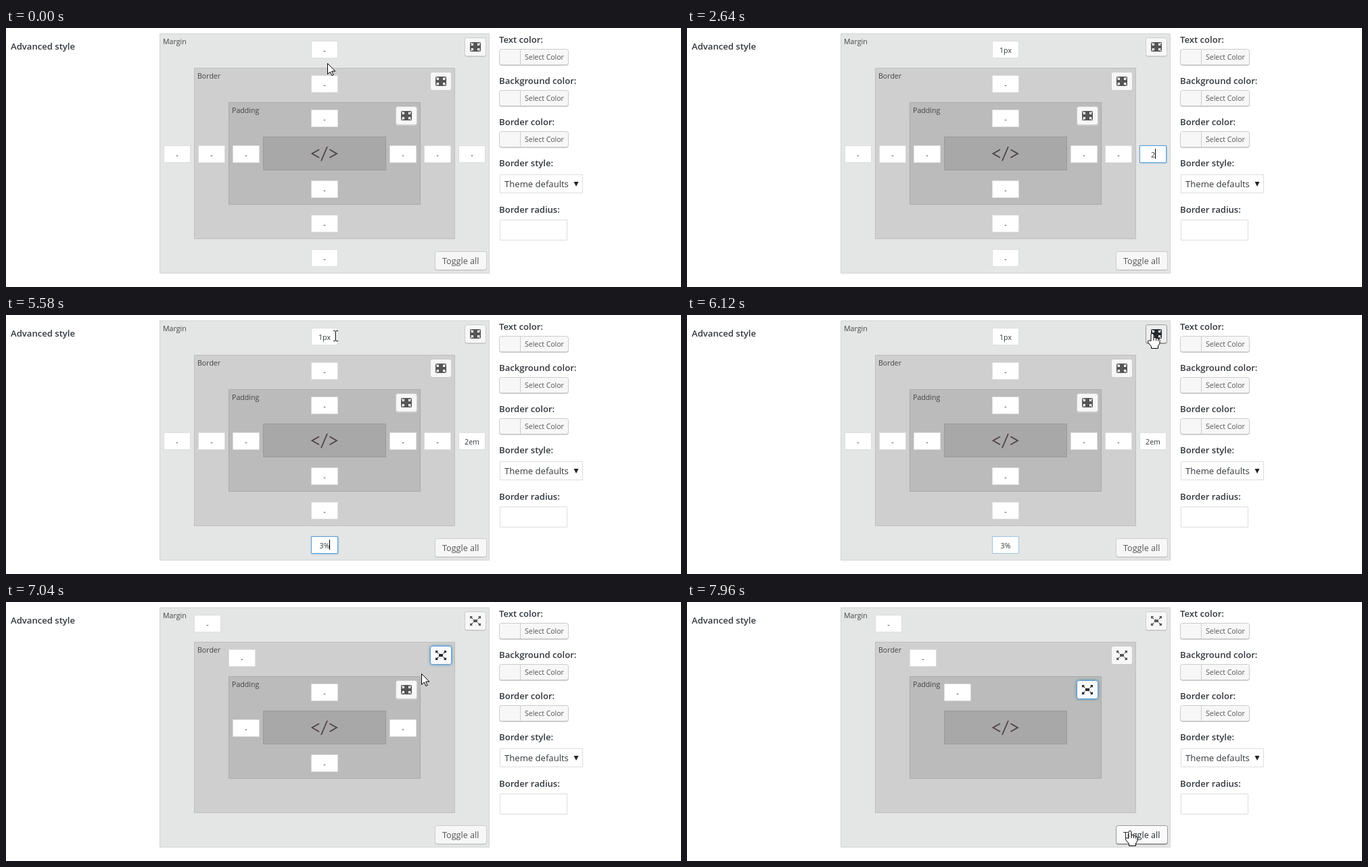
An HTML page with a canvas for the animation above (8 s loop, 998x384 px).

```html
<!DOCTYPE html>
<html lang="en">
<head>
<meta charset="utf-8">
<title>Advanced style</title>
<style>
  html, body { margin: 0; width: 100%; height: 100%; overflow: hidden; background: #fff; }
  canvas { display: block; }
</style>
</head>
<body>
<canvas id="stage" width="998" height="384"></canvas>
<script>
const ctx = document.getElementById('stage').getContext('2d');
const LOOP = 8000, STEP = 76.5;
const SANS = '"Open Sans", "Noto Sans", sans-serif';
const BLUE = '#5b9dd9';

const contractIcon = new Path2D('M15.75 6.75L18 3v14l-2.25-3.75L17 12h-4v4l1.25-1.25L18 17H2l3.75-2.25L7 16v-4H3l1.25 1.25L2 17V3l2.25 3.75L3 8h4V4L5.75 5.25 2 3h16l-3.75 2.25L13 4v4h4z');
const expandIcon = new Path2D('M7 8h6v4H7zM2 13v4h4l-1.2-1.2L7 12l-3.8 2.2zM14 17h4v-4l-1.2 1.2L13 12l2.2 3.8zM14 3l1.3 1.3L13 8l3.8-2.2L18 7V3zM6 3H2v4l1.2-1.2L7 8 4.7 4.3z');
const arrow = new Path2D('M.5 .5V16.5L4.2 13L6.9 18.6L9.2 17.5L6.6 12.1H11.8Z');
const hand = new Path2D('M-2 11.5V1.5Q0-1.5 2 1.5V6.5Q4 5.5 5.5 7.5Q7.5 6.5 8.5 8.5Q11 8 11 10.5V15L8.5 19V22.5H-1.5V19.5L-6.5 13.5Q-7 10.5-4.5 10.7Z');
const beam = new Path2D('M-3 -7.5H0M1 -7.5H4M.5 -7V7M-3 7.5H0M1 7.5H4');
const code = new Path2D('M463 180.2L452.5 186.2L463 192.2M466 197L475 176M478.5 180.2L489 186.2L478.5 192.2');

// Each layer is inset by 51 px from the one around it.
const layers = [
  { name: 'Margin', fill: '#e4e6e5', edge: '#d2d4d3', press: 6120, fold: 6200 },
  { name: 'Border', fill: '#cfcfcf', edge: '#bfbfbf', press: 6740, fold: 6815 },
  { name: 'Padding', fill: '#babbba', edge: '#a9aaa9', press: 7275, fold: 7350 },
];

// Margin sides: when each has focus, and what it reads over time.
const typing = [
  { from: 453, to: 2180, keys: [[930, '1'], [1630, '1p'], [1800, '1px']] },
  { from: 2180, to: 3330, keys: [[2640, '2'], [3020, '2e'], [3100, '2em']] },
  { from: 3330, to: 6120, keys: [[3790, '3'], [4650, '3%']] },
  { from: 0, to: 0, keys: [] },
];

// Pointer stops: time, x, y
const route = [
  [0, 475, 52], [70, 478, 51], [225, 504, 38], [400, 475, 31], [5500, 475, 31],
  [6040, 688, 27], [6270, 688, 27], [6660, 645, 75], [6815, 645, 75],
  [7200, 593, 127], [7350, 593, 127], [7940, 655, 339], [8000, 655, 339],
];

function pointerAt(t) {
  const i = Math.max(1, route.findIndex(stop => stop[0] > t));
  const [t0, x0, y0] = route[i - 1], [t1, x1, y1] = route[i];
  const p = (t - t0) / (t1 - t0), e = p * p * (3 - 2 * p);
  return { x: Math.round(x0 + (x1 - x0) * e), y: Math.round(y0 + (y1 - y0) * e) };
}

const inside = (p, x, y, w, h) => p.x >= x && p.x < x + w && p.y >= y && p.y < y + h;

function text(str, x, y, size, color = '#444', weight = 400, align = 'left') {
  ctx.font = `${weight} ${size}px ${SANS}`;
  ctx.textAlign = align;
  ctx.fillStyle = color;
  ctx.fillText(str, x, y);
}

function box(x, y, w, h, fill, edge, radius = 0, glow = 0) {
  ctx.beginPath();
  ctx.roundRect(x + .5, y + .5, w - 1, h - 1, radius);
  ctx.save();
  ctx.shadowColor = 'rgba(0,115,170,.8)';
  ctx.shadowBlur = glow;
  ctx.fillStyle = fill;
  ctx.fill();
  ctx.restore();
  ctx.strokeStyle = edge;
  ctx.stroke();
}

function button(x, y, w, h, { hover, focus, pressed } = {}) {
  const edge = pressed || (hover && !focus) ? '#999' : focus ? BLUE : '#ccc';
  if (!focus) box(x, y + 1, w, h, edge, edge, 3);
  box(x, y, w, h, pressed ? '#eee' : hover || focus ? '#fafafa' : '#f7f7f7', edge, 3, focus ? 4 : 0);
}

function input(x, y, value, focus, fading) {
  box(x, y, 40, 26, '#fff', focus ? BLUE : fading ? '#9cc3e8' : '#ddd', 0, focus ? 3 : 0);
  text(value || '-', x + 20, y + 18, 10.6, '#32373c', 400, 'center');
  if (focus) {
    const half = value ? ctx.measureText(value).width / 2 : 0;
    ctx.fillStyle = '#000';
    ctx.fillRect(Math.round(x + 20 + half), y + 5, 1, 15);
  }
}

function drawLayer(layer, i, t, pointer) {
  const d = i * 51, folded = t >= layer.fold;
  box(227 + d, 8 + d, 488 - 2 * d, 356 - 2 * d, layer.fill, layer.edge);
  text(layer.name, 232 + d, 24 + d, 10.6);

  const bx = 678 - d, by = 14 + d;
  const hover = inside(pointer, bx, by, 32, 28);
  const nextPress = i < 2 ? layers[i + 1].press : LOOP;
  const focus = folded && t < nextPress;
  button(bx, by, 32, 28, { hover, focus, pressed: t >= layer.press && !folded });
  ctx.save();
  ctx.translate(bx + 6, by + 4);
  ctx.fillStyle = hover || focus ? '#23282d' : '#555';
  ctx.fill(folded ? expandIcon : contractIcon);
  ctx.restore();
}

function drawInputs(layer, i, t) {
  const d = i * 51;
  if (t >= layer.fold) return input(278 + d, 19 + d);
  const sides = [[451, 19 + d], [669 - d, 174], [451, 328 - d], [233 + d, 174]];
  sides.forEach(([x, y], side) => {
    const { from, to, keys } = i ? typing[3] : typing[side];
    const key = keys.filter(k => k[0] <= t).pop();
    input(x, y, key && key[1], t >= from && t < to, side === 2 && to && t >= to);
  });
}

function drawSidebar() {
  const label = (str, y) => text(str, 729, y, 13.1, '#32373c', 600);
  ['Text color:', 'Background color:', 'Border color:'].forEach((name, i) => {
    const y = 31 + i * 61;
    label(name, y - 9);
    button(729, y, 103, 24);
    ctx.fillStyle = '#ccc';
    ctx.fillRect(760, y, 1, 24);
    text('Select Color', 767, y + 16, 10.5, '#555');
  });
  label('Border style:', 205);
  box(730, 217, 123, 28, '#fff', '#ddd');
  text('Theme defaults', 737, 236, 13.1, '#32373c');
  ctx.fillStyle = '#222';
  ctx.fill(new Path2D('M839.5 228H846.5L843 235Z'));
  label('Border radius:', 274);
  box(730, 284, 100, 31, '#fff', '#ddd');
}

function drawPointer(p, t) {
  if (t >= 2180 && t < 5570) return;
  const overButton = inside(p, 634, 331, 77, 28) ||
    layers.some((_, i) => inside(p, 678 - i * 51, 14 + i * 51, 32, 28));
  ctx.save();
  ctx.translate(p.x, p.y);
  ctx.strokeStyle = '#000';
  if (t < layers[0].fold && inside(p, 451, 19, 40, 26)) {
    ctx.stroke(beam);
  } else {
    const shape = overButton ? hand : arrow;
    ctx.fillStyle = '#fff';
    ctx.fill(shape);
    ctx.stroke(shape);
    if (overButton) ctx.stroke(new Path2D('M2 6.5V11M5.5 7.5V11M8.5 8.5V11.5'));
  }
  ctx.restore();
}

function draw(now) {
  const t = now % LOOP;
  const stepped = Math.max(0, 70 + Math.floor((t - 70) / STEP) * STEP);
  const pointer = pointerAt(stepped);
  ctx.fillStyle = '#fff';
  ctx.fillRect(0, 0, 998, 384);
  text('Advanced style', 7, 32, 13.1, '#32373c', 600);
  layers.forEach((layer, i) => drawLayer(layer, i, t, pointer));
  box(380, 161, 182, 50, '#a8a8a8', '#999');
  ctx.lineWidth = 1.8;
  ctx.strokeStyle = '#4c4247';
  ctx.stroke(code);
  ctx.lineWidth = 1;
  layers.forEach((layer, i) => drawInputs(layer, i, t));
  const hover = inside(pointer, 634, 331, 77, 28);
  button(634, 331, 77, 28, { hover });
  text('Toggle all', 645, 350, 12.6, hover ? '#23282d' : '#555');
  drawSidebar();
  drawPointer(pointer, t);
  requestAnimationFrame(() => draw(performance.now()));
}
draw(performance.now());
</script>
</body>
</html>
```
